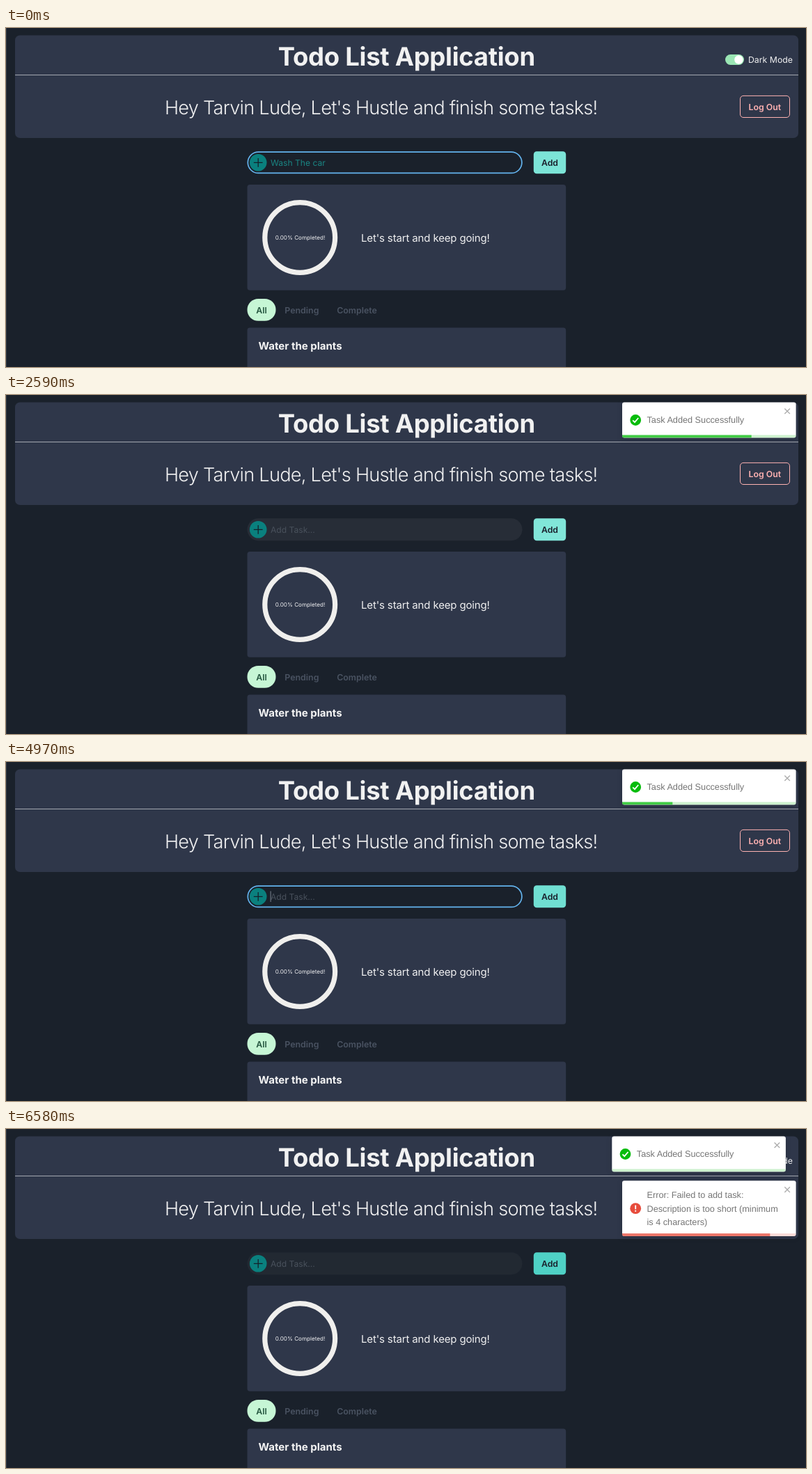
Write an HTML page that moves like this. It is 1149 px wide and 487 px high and loops after 6650 ms.

```html
<!DOCTYPE html>
<html lang="en">
<head>
<meta charset="utf-8">
<title>Todo List Application</title>
<style>
  html, body { margin: 0; width: 100%; height: 100%; overflow: hidden; background: #1a212b; }
  svg {
    display: block; font: 12.3px Inter, Roboto, sans-serif;
    font-optical-sizing: none; text-rendering: geometricPrecision;
  }
  .panel { fill: #2f374a; }
  .semi { font-weight: 600; }
  .mid { text-anchor: middle; }
  .toast { font: 12.7px "Liberation Sans", Arial, sans-serif; }
  .toast text { fill: #757575; }
  .card { fill: #fff; filter: drop-shadow(0 2px 4px rgba(0, 0, 0, .12)); }
</style>
</head>
<body>
<svg id="page" width="1149" height="487" viewBox="0 0 1149 487">
  <rect width="1" height="487" fill="#343b45"/>
  <rect class="panel" x="13" y="10.5" width="1125" height="147.5" rx="7"/>
  <rect x="13" y="67" width="1125" height="1" fill="#a3a8b0"/>
  <text class="mid" x="575.3" y="53.5" font-size="36.5" font-weight="700" letter-spacing="-.3" fill="#f1f1f1">Todo List Application</text>
  <rect x="1033" y="38" width="27" height="15" rx="7.5" fill="#9ae6b4"/>
  <circle cx="1052.4" cy="45.5" r="6.2" fill="#fff"/>
  <text x="1066" y="50" fill="#f0f0f1">Dark Mode</text>
  <text class="mid" x="538.7" y="123.5" font-size="27.2" font-weight="300" letter-spacing="-.75" fill="#f0f0f1">Hey Tarvin Lude, Let's Hustle and finish some tasks!</text>
  <rect x="1054.5" y="97.4" width="71" height="31.1" rx="4.5" fill="none" stroke="#feb2b2"/>
  <text class="semi mid" x="1089.8" y="117.6" fill="#feb2b2">Log Out</text>

  <rect id="field" x="346.5" y="177.3" width="395" height="31.9" rx="15.9" fill="#fff"/>
  <rect id="ring" x="347.3" y="178.2" width="393.6" height="30.2" rx="15.1" fill="none" stroke="#63b3ed" stroke-width="1.7"/>
  <circle cx="362.2" cy="193.3" r="12.3" fill="#0a807e"/>
  <path d="M355.8 193.3h12.8M362.2 186.9v12.8" stroke="#14202a" stroke-width="1.3"/>
  <text id="entry" x="380" y="197.8" font-size="12.1"></text>
  <rect id="caret" x="379.6" y="185.5" width="1" height="15.5" fill="#7b8490"/>
  <rect id="add" x="757.8" y="177.3" width="46.4" height="31.9" rx="4.5"/>
  <text class="semi mid" x="781" y="197.8" fill="#1a202c">Add</text>

  <rect class="panel" x="346.5" y="225" width="457.7" height="151.7" rx="4"/>
  <circle cx="422.2" cy="301" r="50.4" fill="none" stroke="#f0efed" stroke-width="7.2"/>
  <text class="mid" x="422.5" y="303.8" font-size="8.1" fill="#eeeef0">0.00% Completed!</text>
  <text x="510" y="306.7" font-size="15" letter-spacing="-.15" fill="#f0f0f1">Let's start and keep going!</text>

  <rect x="346.5" y="388.9" width="41" height="31.9" rx="15.9" fill="#c6f6d5"/>
  <text class="semi mid" x="367" y="409.5" fill="#22543d">All</text>
  <text class="semi" x="400.3" y="409.5" font-size="12.4" fill="#4a5362">Pending</text>
  <text class="semi" x="475.2" y="409.5" font-size="12.4" fill="#4a5362">Complete</text>
  <rect class="panel" x="346.5" y="430.5" width="457.7" height="80" rx="4"/>
  <text x="362.6" y="461.7" font-size="15" font-weight="700" fill="#f4f4f4">Water the plants</text>
</svg>

<script>
const LOOP = 6650, STEP = 70, BAR_TIME = 5240, ENTER_TIME = 520, EXIT_TIME = 730;
const LEFT = 885, WIDTH = 249.6;
const $ = id => document.getElementById(id);
const clamp = v => Math.max(0, Math.min(1, v));
const lerp = (a, b, k) => a + (b - a) * k;
const ramp = (t, start, time = 200) => clamp((t - start) / time);

// cubic-bezier(.215, .61, .355, 1)
function ease(x) {
  const curve = (a, b, u) => 3 * (1 - u) ** 2 * u * a + 3 * (1 - u) * u * u * b + u ** 3;
  let lo = 0, hi = 1;
  for (let i = 0; i < 24; i++) {
    const mid = (lo + hi) / 2;
    if (curve(.215, .355, mid) < x) lo = mid; else hi = mid;
  }
  return curve(.61, 1, lo);
}

// stops: [position, x offset, opacity]
function keyframes(stops, p) {
  const i = Math.max(1, stops.findIndex(s => s[0] >= p));
  const a = stops[i - 1], b = stops[i];
  const k = ease((p - a[0]) / (b[0] - a[0]));
  return [lerp(a[1], b[1], k), lerp(a[2], b[2], k)];
}
const ENTER = [[0, 2340, .35], [.6, -19.5, 1], [.75, 7.8, 1], [.9, -3.9, 1], [1, 0, 1]];
const EXIT = [[0, 0, 1], [.2, -15.6, 1], [1, 1560, 0]];

function makeToast(id, top, height, color, icon, lines, start) {
  const cy = height / 2;
  const text = lines.map((line, i) =>
    `<text x="35.5" y="${cy + 4.4 + 19.2 * (i - (lines.length - 1) / 2)}">${line}</text>`).join("");
  const card = `<rect class="card" width="${WIDTH}" height="${height}" rx="3"/>`;
  $("page").insertAdjacentHTML("beforeend", `<g class="toast" id="${id}">
    <clipPath id="${id}-clip"><rect width="${WIDTH}" height="${height}" rx="3"/></clipPath>
    ${card}
    <circle cx="19.2" cy="${cy}" r="7.9" fill="${color}"/>
    <path transform="translate(19.2 ${cy})" d="${icon}" fill="none" stroke="#fff" stroke-width="1.8"/>
    ${text}
    <path d="M233.3 9l7.6 7.6m0-7.6l-7.6 7.6" stroke="#000" stroke-opacity=".32" stroke-width="1.4"/>
    <g clip-path="url(#${id}-clip)" fill="${color}">
      <rect y="${height - 4}" width="${WIDTH}" height="4" opacity=".2"/>
      <rect id="${id}-bar" y="${height - 4}" height="4" opacity=".7"/>
    </g>
  </g>`);
  const el = $(id), bar = $(id + "-bar");
  return t => {
    const barStart = start + ENTER_TIME, end = barStart + BAR_TIME;
    const [x, opacity] = t < end
      ? keyframes(ENTER, ramp(t, start, ENTER_TIME))
      : keyframes(EXIT, ramp(t, end, EXIT_TIME));
    el.setAttribute("visibility", t < start ? "hidden" : "visible");
    el.setAttribute("transform", `translate(${LEFT + x} ${top})`);
    el.setAttribute("opacity", opacity);
    bar.setAttribute("width", WIDTH * (1 - ramp(t, barStart, BAR_TIME)));
  };
}

const toasts = [
  makeToast("done", 10.5, 51, "#07bc0c", "M-4 .3l2.8 2.8L4-3", ["Task Added Successfully"], 727.5),
  makeToast("fail", 74.3, 79.7, "#e74c3c", "M0-4.6v5.6M0 2.6v1.9",
    ["Error: Failed to add task:", "Description is too short (minimum", "is 4 characters)"], 5277.5)
];

const FOCUS = 2840, BLUR = 5100;

function draw(t) {
  const hover = ramp(t, -20) - ramp(t, 2150) + ramp(t, 4900);
  const focus = 1 - ramp(t, 530) + ramp(t, FOCUS) - ramp(t, BLUR);
  const over = ramp(t, 2300) - ramp(t, FOCUS);
  const typed = t < 640;
  const [r, g, b] = [[129, 79], [230, 209], [217, 197]].map(([from, to]) => lerp(from, to, hover));
  $("add").setAttribute("fill", `rgb(${r},${g},${b})`);
  $("ring").setAttribute("opacity", focus);
  $("field").setAttribute("opacity", (.035 + .02 * over) * (1 - focus));
  $("entry").textContent = typed ? "Wash The car" : "Add Task...";
  $("entry").setAttribute("fill", typed ? "#1a8583" : "#49515c");
  const blink = Math.floor((t - FOCUS) / 500) % 2 === 0;
  $("caret").setAttribute("opacity", t >= FOCUS && t < BLUR && blink ? 1 : 0);
  toasts.forEach(update => update(t));
}

// the picture advances in even steps
const begin = performance.now();
function tick() {
  const t = (performance.now() - begin) % LOOP;
  draw(Math.floor(t / STEP) * STEP);
  requestAnimationFrame(tick);
}
tick();
</script>
</body>
</html>
```
